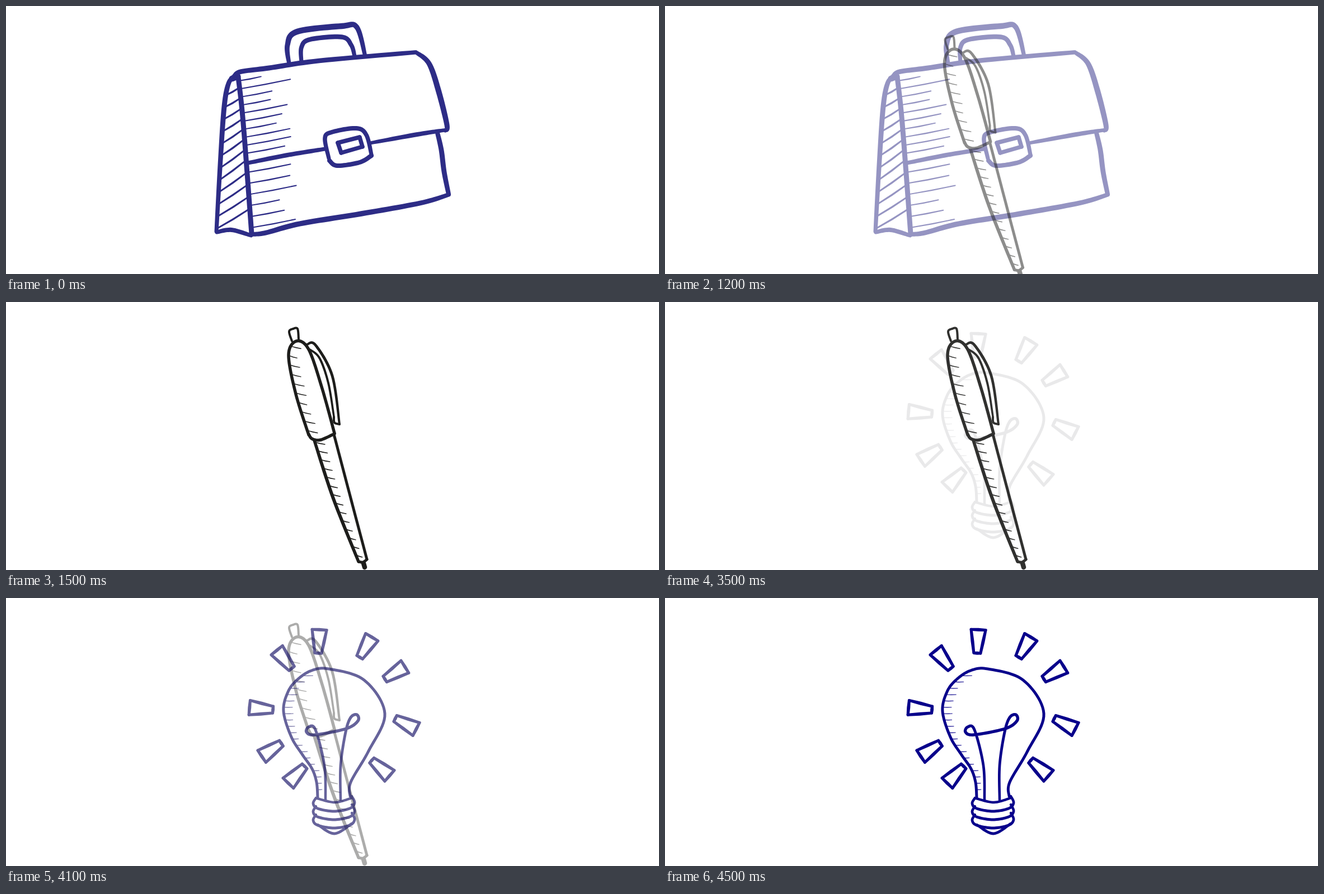
An HTML page for the animation above (6500 ms loop, 1167x480 px).

```html
<!DOCTYPE html>
<html lang="en">
<head>
<meta charset="utf-8">
<title>Briefcase, pen, bulb</title>
<style>
  html, body { margin: 0; width: 100%; height: 100%; overflow: hidden; background: #fff; }
  svg { display: block; width: 100%; height: 100%; }
</style>
</head>
<body>
<svg viewBox="0 0 1167 480">
  <g id="bag" fill="#2d2c86"></g>
  <g id="pen" fill="#1d1d1b"></g>
  <g id="bulb" fill="#08008b"></g>
</svg>
<script>
const $ = id => document.getElementById(id);
const bag = $('bag'), pen = $('pen'), bulb = $('bulb');
const fmt = n => n.toFixed(2);
const mix = (a, b, t) => a + (b - a) * t;

let seed = 7;
const random = (lo, hi) => {
  seed = seed * 16807 % 2147483647;
  return mix(lo, hi, seed / 2147483647);
};

// Catmull-Rom curve through "x,y x,y ..."
function curve(text, steps = 12) {
  const pts = text.trim().split(/\s+/).map(s => s.split(',').map(Number));
  const out = [], last = pts.length - 1;
  for (let i = 0; i < last; i++) {
    const a = pts[Math.max(i - 1, 0)], b = pts[i], c = pts[i + 1], d = pts[Math.min(i + 2, last)];
    for (let j = 0; j < steps; j++) {
      const t = j / steps;
      out.push(b.map((v, k) => v + t / 2 * (c[k] - a[k] +
        t * (2 * a[k] - 5 * v + 4 * c[k] - d[k] + t * (3 * (v - c[k]) + d[k] - a[k])))));
    }
  }
  out.push(pts[last]);
  return out;
}

// Ink stroke with round ends that swells from width w to mid halfway
function ink(group, line, w, mid = w) {
  const left = [], right = [], last = line.length - 1;
  line.forEach(([x, y], i) => {
    const a = line[Math.max(i - 1, 0)], b = line[Math.min(i + 1, last)];
    const dx = b[0] - a[0], dy = b[1] - a[1];
    const r = mix(w, mid, Math.sin(Math.PI * i / last)) / 2 / (Math.hypot(dx, dy) || 1);
    left.push(fmt(x + dy * r) + ' ' + fmt(y - dx * r));
    right.unshift(fmt(x - dy * r) + ' ' + fmt(y + dx * r));
  });
  const cap = `A${w / 2} ${w / 2} 0 0 1 `;
  const path = document.createElementNS('http://www.w3.org/2000/svg', 'path');
  path.setAttribute('d', 'M' + left.join('L') + cap + right[0] + 'L' + right.join('L') + cap + left[0] + 'Z');
  group.append(path);
}

const stroke = (group, text, w, mid) => {
  const line = curve(text);
  ink(group, line, w, mid);
  return line;
};

const polygon = (group, pts, w, mid) =>
  pts.forEach((p, i) => ink(group, [p, p.map((v, k) => (v + pts[(i + 1) % pts.length][k]) / 2),
    pts[(i + 1) % pts.length]], w, mid));

// x of a curve at height y
function xAt(line, y) {
  const i = line.findIndex((p, k) => k && (line[k - 1][1] - y) * (p[1] - y) <= 0);
  const [a, b] = [line[i - 1], line[i]];
  return mix(a[0], b[0], (y - a[1]) / (b[1] - a[1] || 1));
}

// n short lines starting on an edge between heights y0 and y1; size(i) gives [dx, dy]
function hatch(group, edge, y0, y1, n, w, size) {
  for (let i = 0; i < n; i++) {
    const y = mix(y0, y1, i / (n - 1)), x = xAt(edge, y), [dx, dy] = size(i, y);
    ink(group, [[x, y], [x + dx / 2, y + dy / 2 + w / 4], [x + dx, y + dy]], w * .8, w);
  }
}

function drawBag() {
  const side = stroke(bag, '376,404 383,280 390,180 398,138 409,126', 7, 9);
  const edge = stroke(bag, '415,127 424,210 439,408', 9);
  stroke(bag, '404,130 414,126', 11);
  stroke(bag, '377,405 403,401 438,411', 7, 8);
  stroke(bag, '408,125 420,117.5 470,111 560,98 731,83', 7.5, 9);
  stroke(bag, '733,83 756,103 773,152 788,213 785,223', 7, 10);
  stroke(bag, '786,222 735,230 653,245', 6, 8);
  stroke(bag, '433,281 500,267.5 570,256', 7, 8);
  stroke(bag, '771,227 778,258 783,297 791,337', 8, 9);
  stroke(bag, '791,338 740,353 635,372 525,390 465,406 441,409', 7.5, 9.5);

  stroke(bag, '506,104 503,70 520,46 600,36 627,38 642,90', 7, 10.5);
  stroke(bag, '528,101 528,74 543,60 600,55.5 617,70 623,90', 7, 8.5);

  stroke(bag, '577,273 570,237 582,226 626,219 644,231 653,266', 7, 8);
  stroke(bag, '653,268 632,280 592,286 578,277', 8);
  polygon(bag, [[593, 245], [632, 235], [637, 252], [599, 263]], 7.5);

  hatch(bag, side, 160, 399, 12, 3.4, (i, y) => {
    const rise = Math.min(36, 14 + 3.2 * i);
    return [xAt(edge, y - rise) - xAt(side, y), -rise];
  });
  const shade = () => {
    const len = random(40, 95);
    return [len, -len * .19];
  };
  hatch(bag, edge, 134, 264, 10, 2.4, shade);
  hatch(bag, edge, 298, 397, 6, 2.4, shade);
}

function drawPen() {
  stroke(pen, '511,70 506,53 513,48 521,48 523,67', 4);
  const cap = stroke(pen, '541,238 518,165 505,95 519,70 541,85 565,155 587,235', 5.5);
  stroke(pen, '587,236 562,247 547,245 541,237', 5.5);
  stroke(pen, '538,76 553,77 583,132 596,219', 4, 5);
  stroke(pen, '541,84 560,100 576,145 586,205', 3.5, 4);
  stroke(pen, '596,219 587,216 586,206', 4);
  const barrel = stroke(pen, '551,248 585,352 630,465', 5.5, 6);
  stroke(pen, '586,237 617,355 645,461', 5);
  stroke(pen, '630,465 638,466 645,461', 5);
  stroke(pen, '639,468 641,475', 8.5);

  hatch(pen, cap, 79, 230, 10, 1.6, () => [random(15, 20), 4.5]);
  hatch(pen, barrel, 251, 453, 14, 1.8, i => [18 - i * .5, 4]);
}

function drawBulb() {
  const glass = stroke(bulb, `557,357 555,330 547,306 530,281 510,249 496,203 504,168 521,146 546,130
    577,127 640,147 677,207 648,274 616,330 615,355`, 5);
  hatch(bulb, glass, 343, 139, 19, 1.2, i => [random(6, 10) + i * .6, 0]);

  stroke(bulb, `598,362 598,300 607,240 616,214 627,209 629,220 608,234 552,245 537,240 541,231
    553,236 569,300 571,362`, 4.5, 5.5);

  // Screw base: rim, three turns, foot
  stroke(bulb, '556,359 588,366 618,358', 4.5);
  for (let y = 358; y < 400; y += 15)
    stroke(bulb, [[554, 0], [549, 10], [557, 19], [586, 24], [614, 19], [623, 9], [618, -3]]
      .map(([x, dy]) => [x, y + dy]).join(' '), 4.5, 5);
  stroke(bulb, '557,406 587,422 618,404', 4.5, 5);

  // Rays: direction from the bulb and own tilt, in degrees
  [[-102, 15], [-133, 4], [-64, 5], [-33, 1], [9, 18], [50, -9], [183, 2], [149, -3], [121, 13]]
    .forEach(([dir, tilt]) => ray(dir * Math.PI / 180, (dir + tilt) * Math.PI / 180));
}

function ray(dir, axis) {
  const cx = 586 + 130 * Math.cos(dir), cy = 205 + 130 * Math.sin(dir);
  const c = Math.cos(axis), s = Math.sin(axis);
  const corners = [[21, -13], [21, 13], [-21, 6], [-21, -6]];
  polygon(bulb, corners.map(([u, v]) => [cx + u * c - v * s, cy + u * s + v * c]), 5, 6);
}

const LOOP = 6500, STEP = 100;
const INK = [29, 29, 27], BLUE = [8, 0, 139];

// Stepped cross-fade, from 0 before the start to 1 on the last step
const fade = (t, start, steps) =>
  Math.max(0, Math.min(1, (Math.floor((t - start) / STEP) + 1) / steps));

function render(t) {
  const a = fade(t, 1000, 6), b = fade(t, 3500, 11), back = 1 - a;
  bag.setAttribute('opacity', back);
  pen.setAttribute('opacity', a * (1 - b));
  pen.setAttribute('transform', `translate(${-11 * back} ${15 * back})`);
  bulb.setAttribute('opacity', b);
  bulb.setAttribute('fill', `rgb(${INK.map((v, i) => Math.round(mix(v, BLUE[i], b)))})`);
}

drawBag();
drawPen();
drawBulb();

const begin = performance.now();
function tick() {
  render((performance.now() - begin) % LOOP);
  requestAnimationFrame(tick);
}
tick();
</script>
</body>
</html>
```
